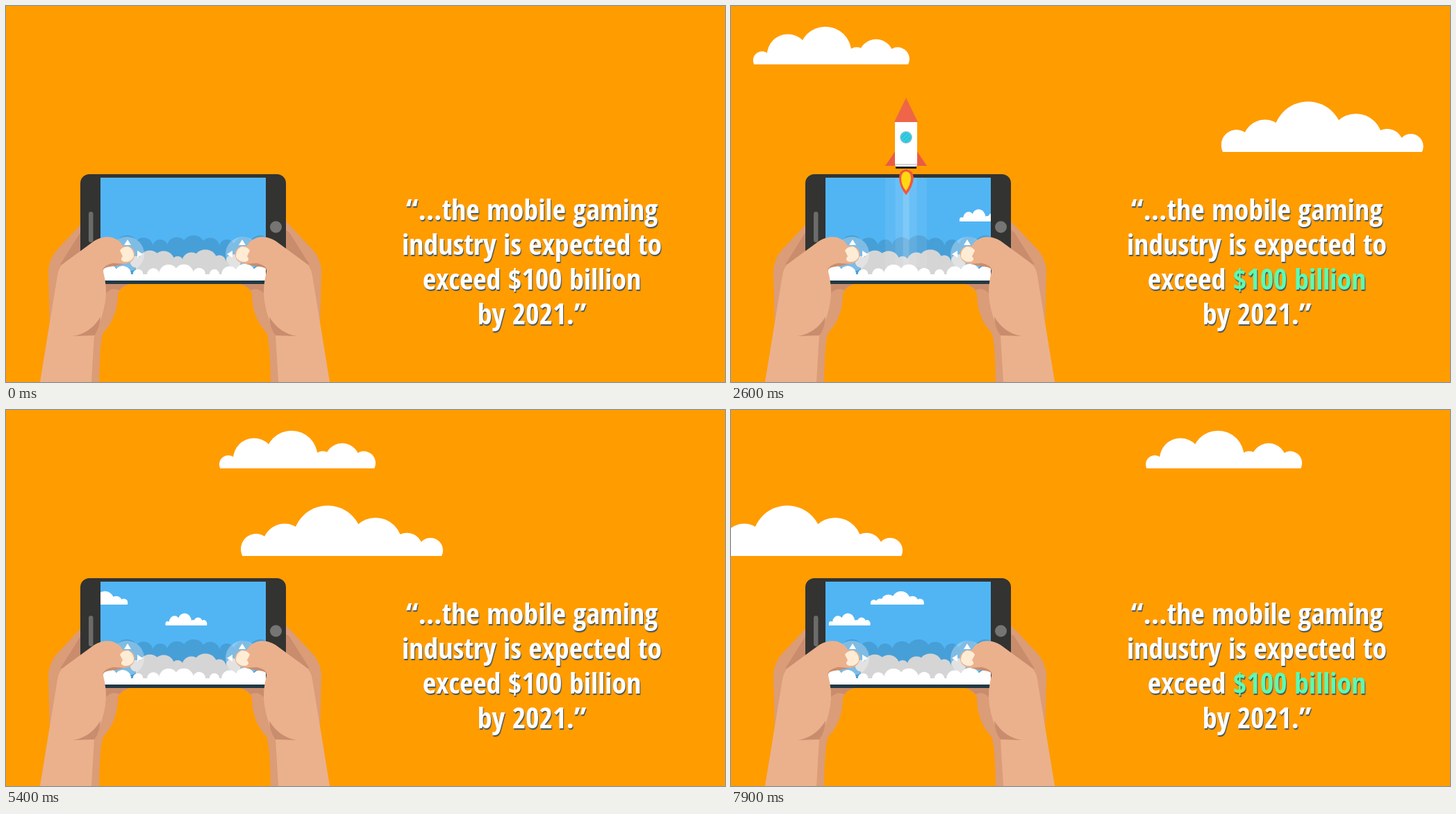
An HTML page with a canvas that plays this animation: 1035x541 px, repeating every 8 s.

```html
<!DOCTYPE html>
<html lang="en">
<head>
<meta charset="utf-8">
<title>Mobile gaming</title>
<style>
  html, body { margin: 0; width: 100%; height: 100%; overflow: hidden; background: #ff9c00; }
  canvas { position: absolute; left: 0; top: 0; }
  p {
    position: absolute; left: 757px; top: 267px; margin: 0;
    transform: translateX(-50%);
    font: bold 42px/50px "Open Sans Condensed", "Open Sans", sans-serif;
    font-stretch: 75%;
    white-space: nowrap; text-align: center;
    color: #fff; text-shadow: 1px 2px 1px #3f5563;
  }
</style>
</head>
<body>
<canvas width="1035" height="541"></canvas>
<p>“...the mobile gaming<br>industry is expected to<br>exceed <span>$100 billion</span><br>by 2021.”</p>
<script>
const ctx = document.querySelector('canvas').getContext('2d');
const amount = document.querySelector('span');

const LOOP = 8, STEP = 0.1, BLINK = 1.8;
const SKIN = '#ebb18d', SKIN_MID = '#db9c78', SKIN_DARK = '#c98d6d';
const SCREEN = [136, 247, 238, 148];

// Key points as [seconds, position]
const topCloudPath = [[0, -235], [1.8, -39], [3.8, 135], [5.4, 307], [6.7, 480], [7.9, 597]];
const bigCloudPath = [[0, 1044], [3.8, 549], [5.4, 338], [7.9, -44]];
const rocketPath = [[0, 385], [1.8, 200], [2.6, 132], [3.8, 86], [5, -190]];

// Cloud outlines: [centre x, radius] of each puff
const topCloud = [[13, 13], [50, 30], [104, 37.5], [149, 17], [177, 25], [208, 17]];
const bigCloud = [[22, 22], [63, 32], [125, 50], [194, 38], [239, 23], [273, 18]];

// Smooth curve through key points
function along(keys, t) {
  const slope = i => {
    const a = keys[Math.max(i - 1, 0)], b = keys[Math.min(i + 1, keys.length - 1)];
    return (b[1] - a[1]) / (b[0] - a[0]);
  };
  let i = 0;
  while (i < keys.length - 2 && t >= keys[i + 1][0]) i++;
  const [t0, v0] = keys[i], [t1, v1] = keys[i + 1];
  const d = t1 - t0, u = Math.min((t - t0) / d, 1), w = 1 - u;
  return v0 * (1 + 2 * u) * w * w + v1 * u * u * (3 - 2 * u)
    + d * u * w * (slope(i) * w - slope(i + 1) * u);
}

function path(d, color) {
  ctx.fillStyle = color;
  ctx.fill(new Path2D(d));
}

function rect(x, y, w, h, color) {
  ctx.fillStyle = color;
  ctx.fillRect(x, y, w, h);
}

function disc(x, y, r, color) {
  ctx.fillStyle = color;
  ctx.beginPath();
  ctx.arc(x, y, r, 0, 7);
  ctx.fill();
}

function rounded(x, y, w, h, r, color) {
  ctx.fillStyle = color;
  ctx.beginPath();
  ctx.roundRect(x, y, w, h, r);
  ctx.fill();
}

function clipped([x, y, w, h], draw) {
  ctx.save();
  ctx.beginPath();
  ctx.rect(x, y, w, h);
  ctx.clip();
  draw();
  ctx.restore();
}

// A flat-bottomed cloud; a negative horizontal scale mirrors it
function cloud(puffs, x, bottom, scaleX = 1, scaleY = 1) {
  ctx.save();
  ctx.translate(x, bottom);
  ctx.scale(scaleX, scaleY);
  clipped([0, -100, 300, 100], () => {
    for (const [px, r] of puffs) disc(px, -0.45 * r, r, '#fff');
    rect(puffs[0][0], -8, puffs.at(-1)[0] - puffs[0][0], 8, '#fff');
  });
  ctx.restore();
}

// A bank of puffs whose radius swings as a sine
function cloudBank(x, step, count, y, r, swing, pace, phase, color) {
  for (let i = 0; i < count; i++) {
    disc(x + step * i, y, r + swing * Math.sin(pace * i + phase), color);
  }
  rect(x, y, step * (count - 1), 395 - y, color);
}

// Draws the left version, then its mirror image
function bothSides(draw) {
  draw();
  ctx.save();
  ctx.translate(515, 0);
  ctx.scale(-1, 1);
  draw();
  ctx.restore();
}

function fingers() {
  path('M122 299L78 346Q62 361 61 382L63 460L122 420Z', SKIN_MID);
  path('M122 315L107 326L78 372L122 365Z', SKIN_DARK);
  path('M136 396H188Q166 401 161 414Q161 448 140 470Q135 480 134 541H118V460Z', SKIN_MID);
  path('M143 398H188Q170 400 163 409Q153 404 144 413Z', SKIN_DARK);
}

function joystick() {
  disc(174, 357, 25, 'rgba(255,255,255,.3)');
  path('M175 336L180 344H170ZM197 357L189 362V352Z', '#fff');
}

function thumb() {
  path('M49 541L74 388Q76 374 86 368L127 338Q140 330 153 333Q163 336 168 345L178 346Q187 351 185 360Q182 371 168 371L152 374Q140 374 140 382Q146 405 143 425Q139 450 127 473L123 541Z', SKIN);
  path('M138 381Q142 372 154 370L170 371Q160 374 150 375Q141 376 138 381Z', SKIN_DARK);
  path('M164 352Q167 346 176 346Q185 351 184 361Q180 369 170 368Q163 366 168 360Z', '#ffecd4');
  path('M96 475Q122 471 136 447Q135 464 127 474Z', SKIN_DARK);
}

function flame(forked) {
  if (forked) {
    path('M252 103Q262 104 263 116Q262 126 259 129L262 137L252 132L244 138L246 129Q241 124 242 114Q243 104 252 103Z', '#f1563f');
    path('M252 106Q259 107 259 116Q258 125 249 132L248 129Q244 121 245 114Q247 106 252 106ZM257 127L259 134L253 130Z', '#ffd813');
  } else {
    path('M252 103Q262 104 263 115Q262 128 252 140Q242 128 242 115Q242 104 252 103Z', '#f1563f');
    path('M252 106Q259 107 259 116Q258 126 252 134Q245 126 245 116Q245 107 252 106Z', '#ffd813');
  }
}

// The nose sits at (252, 0) before the shift
function rocket(y, t) {
  ctx.save();
  ctx.translate(0, y);
  flame(Math.floor(t / 0.4 + 1e-6) % 2);
  path('M237 76L222 98H237ZM267 76L282 98H267Z', '#ea5b43');
  rounded(236, 34, 32, 65, [0, 0, 3, 3], '#fff');
  rect(236, 95, 32, 2, '#d5d9dc');
  path('M252 0L269 35H235Z', '#ee6647');
  rect(237, 99, 30, 3, '#222');
  disc(252, 57, 9, '#b9c6cc');
  disc(252, 57, 8, '#35cde2');
  ctx.strokeStyle = '#2aa9c4';
  ctx.beginPath();
  for (const k of [-3, 0, 3]) {
    ctx.moveTo(248 + k, 61 + k);
    ctx.lineTo(256 + k, 53 + k);
  }
  ctx.stroke();
  ctx.restore();
}

function trail(top, strength) {
  for (const [w, alpha] of [[60, .13], [31, .15], [9, .25]]) {
    rect(252 - w / 2, top, w, Math.max(376 - top, 0), `rgba(255,255,255,${alpha * strength})`);
  }
}

function draw(t) {
  const rocketY = along(rocketPath, t);

  rect(0, 0, 1035, 541, '#ff9c00');
  cloud(topCloud, along(topCloudPath, t), 84);
  cloud(bigCloud, along(bigCloudPath, t), 210);

  bothSides(fingers);
  rounded(107, 242, 296, 158, 13, '#333332');
  rounded(119, 296, 6.5, 44, 3, '#6b6b6a');
  disc(388.5, 318, 8.5, '#757574');

  clipped(SCREEN, () => {
    rect(...SCREEN, '#51b5f4');
    cloudBank(150, 24, 10, 347, 14, 3, 1.6, 0, '#479fd8');
    cloud(topCloud, 421 - 35.5 * t, 310, .267, .32);
    cloud(bigCloud, 41 * t - 46, 280, -.265, .265);
    cloudBank(187, 20, 8, 368, 13, 5, 1.9, -1.2, '#d5d5d5');
    trail(rocketY + 98, Math.max(0, Math.min(1, (3.6 - t) / 1.8)));
  });
  clipped([0, 0, 1035, 388], () => rocket(rocketY, t));
  clipped(SCREEN, () => cloudBank(146, 22, 11, 386, 11, 4, 1.4, 1.5, '#fff'));
  rect(136, 395, 238, 4.5, '#1f3a47');

  bothSides(joystick);
  bothSides(thumb);

  const phase = t % BLINK;
  amount.style.color = phase > 0.25 && phase < 1.15 ? '#5cfbb2' : '';
}

const start = performance.now();
function tick() {
  const t = (performance.now() - start) / 1000 % LOOP;
  draw(Math.floor(t / STEP) * STEP);
  requestAnimationFrame(tick);
}
tick();
</script>
</body>
</html>
```
